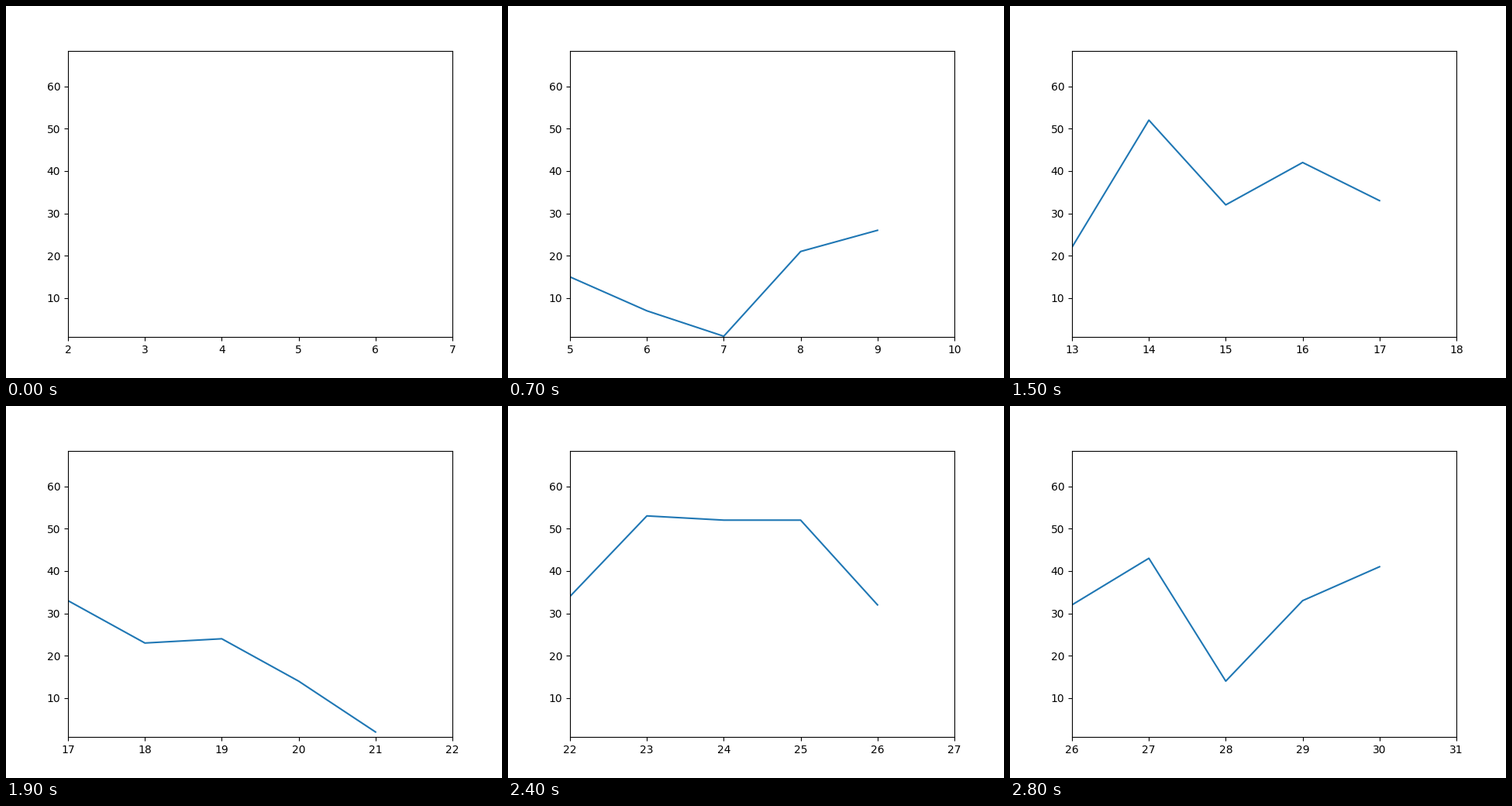
These frames come from a looping animation (640 by 480 pixels, 2.9 s). A matplotlib script:

```python
import matplotlib.pyplot as plt
from matplotlib.animation import FuncAnimation

FRAMES = 29
INTERVAL = 100
START = 2    # x of the first sample
WINDOW = 5   # visible x range
LEAD = 1     # free space ahead of the newest sample

values = [28, 32, 56, 15, 7, 1, 21, 26, 29, 26, 32, 22, 52, 32, 42,
          33, 23, 24, 14, 2, 34, 53, 52, 52, 32, 43, 14, 33, 41]
xs = list(range(START, START + len(values)))

fig, ax = plt.subplots(figsize=(6.4, 4.8), dpi=100)
line, = ax.plot([], [], color="#1f77b4", linewidth=1.5)
ax.set_ylim(0.8, 68.4)


def update(frame):
    """Reveal one more sample and scroll once the window is full."""
    count = frame + 1
    line.set_data(xs[:count], values[:count])
    left = max(START, xs[frame] + LEAD - WINDOW)
    ax.set_xlim(left, left + WINDOW)
    return line,


def reset():
    return update(0)


anim = FuncAnimation(fig, update, frames=FRAMES, init_func=reset,
                     interval=INTERVAL, repeat=True, repeat_delay=0,
                     blit=False)
plt.show()
```
